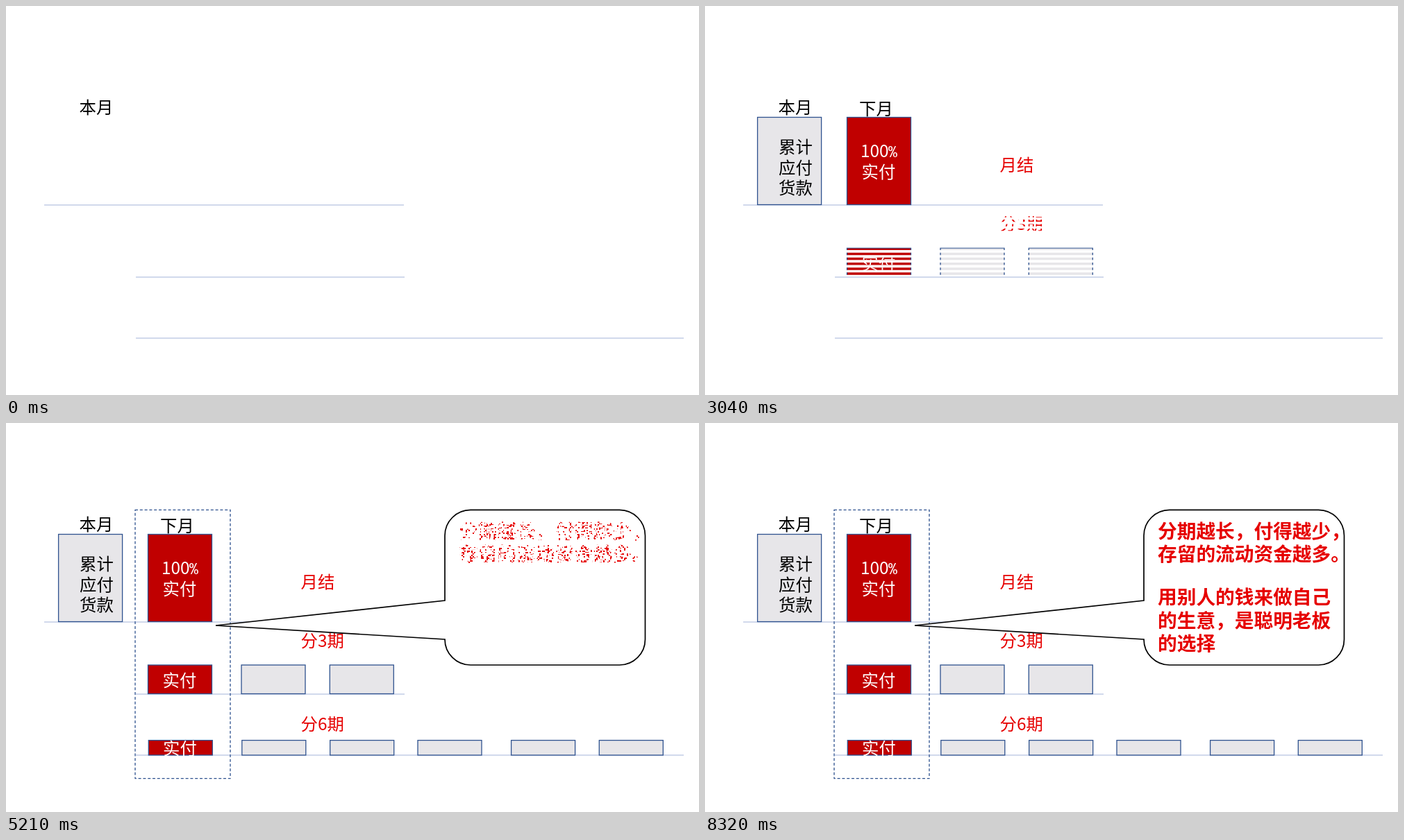
An HTML page for the animation above (8390 ms loop, 998 by 561 pixels).

```html
<!DOCTYPE html>
<html lang="zh-CN">
<head>
<meta charset="utf-8">
<title>分期付款</title>
<style>
html, body { margin: 0; width: 100%; height: 100%; overflow: hidden; background: #fff; }
svg { display: block; width: 100%; height: 100%; }
text { font: 400 24.4px "Noto Sans CJK SC", "Noto Sans CJK", sans-serif; font-weight: 300; white-space: pre; }
.red { fill: #e60000; }
.white { fill: #fff; }
.bold { font-size: 27.7px; font-weight: 700; }
.pct { font: 300 21.5px "Noto Sans Mono", monospace; }
.axis { stroke: #a3b4da; stroke-width: 1.2; }
.due, .paid { stroke: #2f528f; stroke-width: 1.3; fill: #e7e6e9; }
.paid { fill: #c00000; }
.frame { fill: none; stroke: #2f528f; stroke-width: 1.3; stroke-dasharray: 4 2.8; }
.bubble { fill: #fff; stroke: #000; stroke-width: 1.7; stroke-linejoin: miter; }
clipPath path { shape-rendering: crispEdges; }
</style>
</head>
<body>
<svg id="stage" viewBox="0 0 998 561" xmlns="http://www.w3.org/2000/svg"></svg>
<script>
const LOOP = 8390;
const stage = document.getElementById('stage');

const text = (x, y, s, cls = '') => `<text x="${x}" y="${y}" class="${cls}">${s}</text>`;
const axis = (x1, x2, y) => `<path class="axis" d="M${x1} ${y}H${x2}"/>`;
const box = (cls, x, y, w, h) => `<rect class="${cls}" x="${x}" y="${y}" width="${w}" height="${h}"/>`;
const dues = (xs, y, h) => xs.map(x => box('due', x, y, 92, h)).join('');

// Deterministic noise in 0..1
function noise(x, y, seed) {
  let n = Math.imul(x + 1, 374761393) ^ Math.imul(y + 1, 668265263) ^ Math.imul(seed, 1442695041);
  n = Math.imul(n ^ (n >>> 13), 1274126177);
  n = Math.imul(n ^ (n >>> 16), 2246822519);
  return ((n ^ (n >>> 15)) >>> 0) / 4294967296;
}

const cell = (x, y, w, h) => `M${x} ${y}h${w}v${h}h${-w}z`;

// Each effect returns the visible area of a box at progress p
const effects = {
  blinds([x, y, w, h], p) {
    const band = h / 6;
    let d = '';
    for (let i = 0; i < 6; i++) d += cell(x, y + i * band, w, band * p);
    return d;
  },
  bars([x, y, w, h], p, seed) {
    let d = '';
    for (let r = 0; r < h; r++) if (noise(0, r, seed) < p) d += cell(x, y + r, w, 1);
    return d;
  },
  dissolve([x, y, w, h], p, seed) {
    const s = 2;
    let d = '';
    for (let r = 0; r * s < h; r++)
      for (let c = 0; c * s < w; c++)
        if (noise(c, r, seed) < p) d += cell(x + c * s, y + r * s, s, s);
    return d;
  }
};

const parts = [
  { at: 0, art: axis(55, 573, 287) + axis(187, 574, 391) + axis(187, 976, 479) + text(105.5, 155, '本月') },
  { at: 1060, art: box('due', 75.6, 160.5, 92, 126) +
      text(106, 212, '累计') + text(106, 241.5, '应付') + text(106, 271, '货款') },
  { at: 1390, art: text(222, 157, '下月') + text(222, 186.5, '初') },
  { at: 2190, span: 345, effect: 'blinds', boxes: [[203, 160, 95, 127], [415, 209, 70, 39]],
    art: box('paid', 204.5, 160.5, 92, 126) + text(224, 217.5, '100', 'white') +
      text(264, 217.5, '%', 'white pct') + text(225.5, 248, '实付', 'white') +
      text(424.5, 237.5, '月结', 'red') },
  { at: 2860, span: 370, effect: 'blinds', boxes: [[200, 348.5, 370, 43], [415, 295, 85, 39]],
    art: box('paid', 204.5, 349, 92, 41.5) + dues([339, 466.3], 349, 41.5) +
      text(225.5, 380, '实付', 'white') + text(424.5, 323, '分3期', 'red') },
  { at: 3350, span: 400, effect: 'blinds', boxes: [[200, 457, 760, 23], [415, 414.5, 85, 39]],
    art: box('paid', 205.3, 457.6, 92, 21.4) + dues([339.8, 466.7, 593, 727.6, 854.3], 457.6, 21.4) +
      text(226, 478, '实付', 'white') + text(424.5, 443, '分6期', 'red') },
  { at: 4225, span: 385, effect: 'bars', boxes: [[184, 124, 141, 391]],
    art: box('frame', 186, 125.3, 137, 387.4) },
  { at: 4225, span: 385, effect: 'bars', boxes: [[290, 124, 634, 227]],
    art: '<path class="bubble" d="M669 125.4H883.5a37 37 0 0 1 37 37V312a37 37 0 0 1 -37 37H669' +
      'a37 37 0 0 1 -37 -37L302 292L632 256V162.4a37 37 0 0 1 37 -37z"/>' },
  { at: 5080, span: 390, effect: 'dissolve', boxes: [[650, 138, 280, 70]],
    art: text(652, 165.5, '分期越长，付得越少，', 'red bold') + text(652, 199, '存留的流动资金越多。', 'red bold') },
  { at: 5750, span: 390, effect: 'dissolve', boxes: [[650, 234, 260, 104]],
    art: text(652, 261, '用别人的钱来做自己', 'red bold') + text(652, 294.5, '的生意，是聪明老板', 'red bold') +
      text(652, 327.5, '的选择', 'red bold') }
];

stage.innerHTML = parts.map((p, i) =>
  `<clipPath id="clip${i}"><path/></clipPath><g id="part${i}">${p.art}</g>`).join('');
parts.forEach((p, i) => {
  p.node = document.getElementById('part' + i);
  p.clip = document.querySelector(`#clip${i} path`);
});

function draw(t) {
  parts.forEach((p, i) => {
    const k = p.span ? (t - p.at) / p.span : t >= p.at ? 1 : 0;
    const shown = p.span ? k > 0 : k === 1;
    p.node.style.display = shown ? '' : 'none';
    if (shown && k < 1) {
      p.clip.setAttribute('d', p.boxes.map(b => effects[p.effect](b, k, i + 1)).join(''));
      p.node.setAttribute('clip-path', `url(#clip${i})`);
    } else {
      p.node.removeAttribute('clip-path');
    }
  });
}

const start = performance.now();
function tick() {
  draw((performance.now() - start) % LOOP);
  requestAnimationFrame(tick);
}
tick();
</script>
</body>
</html>
```
